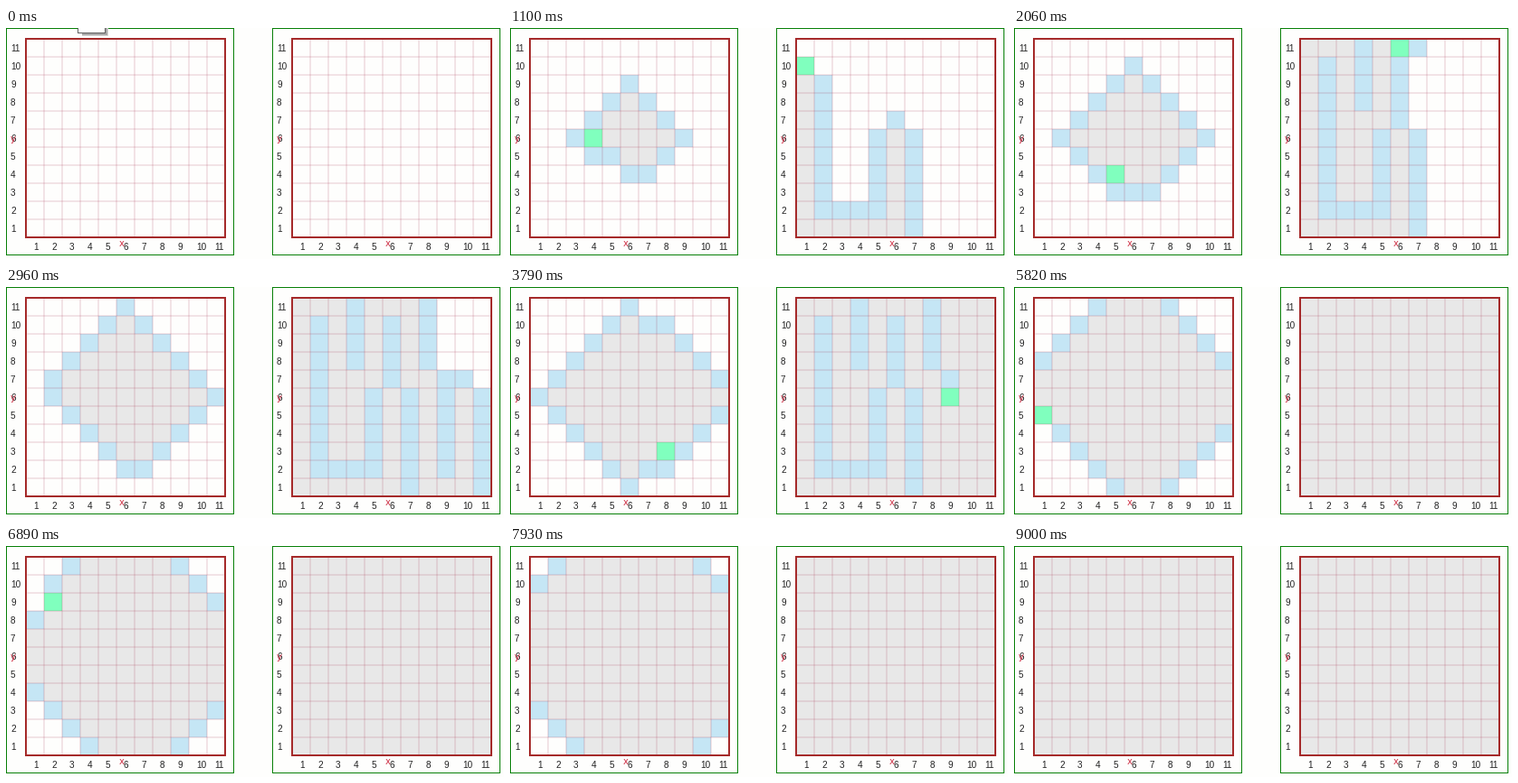
Animation, 550 px wide and 256 px high, one loop 9790 ms. Source, as a matplotlib script:

```python
import numpy as np
import matplotlib.pyplot as plt
from matplotlib.animation import FuncAnimation
from matplotlib.patches import Rectangle

W, H, DPI = 550, 256, 100
STEP, FRAMES = 22, 445          # 22 ms * 445 = 9790 ms
BEGIN = 200                     # ms, pop-up closes and the boards go live
N, CELL = 11, 20
START = (6, 6)
DIRS = [(1, 0), (0, 1), (-1, 0), (0, -1)]

EMPTY, SEEN, ACTIVE, DONE = range(4)
COLORS = np.array([(254, 254, 253), (197, 230, 245),
                   (128, 255, 190), (232, 232, 232)], dtype=np.uint8)


def px(n):
    return n * 72 / DPI


def search(pop_at, start, visit, push):
    """Flood fill as (time, cell, state); visiting and pushing each cost some ms."""
    todo, seen, events = [START], {START}, []

    def log(progress, cell, state):
        time = start + visit * progress + push * (len(seen) - 1)
        events.append((time, cell, state))

    for i in range(N * N):
        x, y = cell = todo.pop(pop_at)
        log(i, cell, ACTIVE)
        for k, (dx, dy) in enumerate(DIRS, 1):
            near = (x + dx, y + dy)
            if near not in seen and all(1 <= c <= N for c in near):
                seen.add(near)
                todo.append(near)
                log(i + k / 8, near, SEEN)
        log(i + 3 / 4, cell, DONE)
    return events


def box(x, y, w, h, color, z):
    return ax.add_patch(Rectangle((x, y), w, h, fc=color, ec="none",
                                  antialiased=False, zorder=z))


def frame(x, y, w, h, t, color, z):
    for r in [(x, y, w, t), (x, y + h - t, w, t), (x, y, t, h), (x + w - t, y, t, h)]:
        box(*r, color, z)


class Board:
    def __init__(self, left, events):
        self.events = events
        x0, y0, size = left + 22, 12, N * CELL
        x1, y1 = x0 + size, y0 + size
        self.image = ax.imshow(COLORS[np.zeros((N, N), int)], extent=(x0, x1, y1, y0),
                               interpolation="nearest", aspect="auto", zorder=1)
        # unsnapped hairlines spread softly over two pixels
        inner = np.arange(1, N) * CELL
        line = dict(lw=px(1), color="#a52a4a", alpha=0.25, snap=False, zorder=2)
        ax.vlines(x0 + inner, y0, y1, **line)
        ax.hlines(y0 + inner, x0, x1, **line)
        frame(left, 0, 252, 252, 1, "#088008", 3)
        frame(x0 - 1, y0 - 1, size + 2, size + 2, 2, "#a52a2a", 4)

        font = dict(family="Liberation Sans", size=px(10), color="#222222", zorder=5)
        for n in range(1, N + 1):
            ax.text(left + 5, y1 - n * CELL + 13.5, str(n), **font)
            ax.text(x0 + (n - 1) * CELL + 8, 246.5, str(n), **font)
        font.update(family="DejaVu Sans", color="#d0354a")
        ax.text(left + 125, 241.5, "x", **font)
        ax.text(left + 5, 126.5, "y", **font)

    def show(self, t):
        grid = np.full((N, N), EMPTY)
        for when, (x, y), state in self.events:
            if t < max(when, BEGIN):
                break
            grid[N - y, x - 1] = state
        self.image.set_data(COLORS[grid])


fig = plt.figure(figsize=(W / DPI, H / DPI), dpi=DPI, facecolor="#fefefd")
ax = fig.add_axes([0, 0, 1, 1])
breadth_first = search(0, start=311, visit=67.6, push=4)
depth_first = search(-1, start=141, visit=28.22, push=10.29)
boards = [Board(0, breadth_first), Board(294, depth_first)]
ax.set_xlim(0, W)
ax.set_ylim(H, 0)
ax.axis("off")

# lower edge of a pop-up hanging in from above, with its shadow
popup = [box(84, 0, 29, 9, "#d8d8d8", 6), box(84, 0, 28, 8, "#a8a8a8", 7),
         box(79, 0, 31, 6, "#606060", 8), box(80, 0, 29, 5, "#ffffff", 9)]


def draw(i):
    t = (i + 0.5) * STEP
    for part in popup:
        part.set_visible(t < BEGIN)
    for board in boards:
        board.show(t)
    return [b.image for b in boards] + popup


anim = FuncAnimation(fig, draw, frames=FRAMES, interval=STEP, repeat=True, repeat_delay=0)
plt.show()
```
